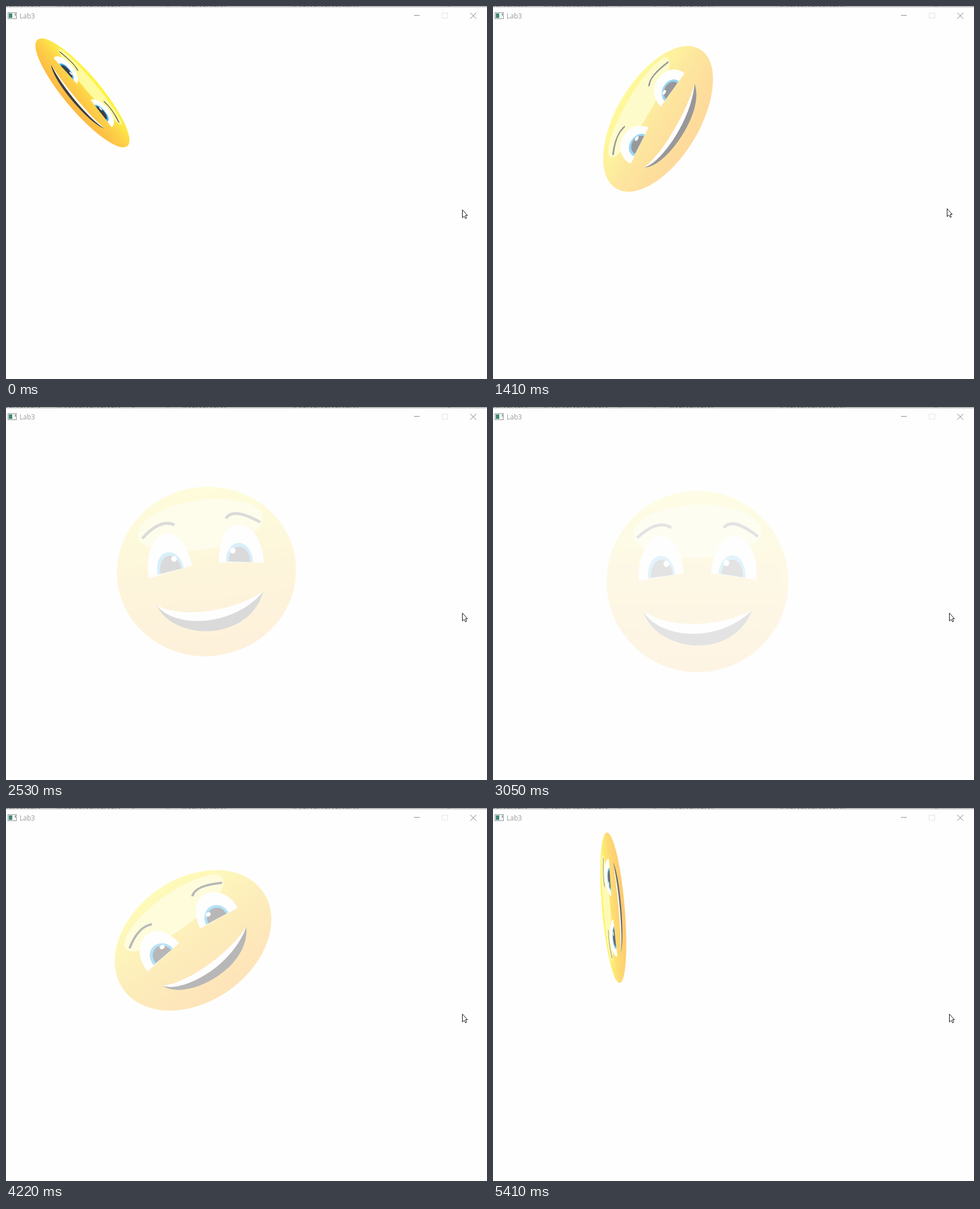
An HTML page that plays this animation: 850 px wide and 658 px high, repeating every 5510 ms.

```html
<!DOCTYPE html>
<html lang="en">
<head>
<meta charset="utf-8">
<title>Lab3</title>
<style>
html, body { margin: 0; width: 100%; height: 100%; overflow: hidden; background: #fefefe; }
svg { display: block; }
</style>
</head>
<body>
<svg width="850" height="658" viewBox="0 0 850 658">
  <defs>
    <linearGradient id="skin" x1="0" y1="0" x2="0" y2="1">
      <stop offset="0" stop-color="#fff640"/>
      <stop offset=".25" stop-color="#fde748"/>
      <stop offset=".5" stop-color="#fdd148"/>
      <stop offset=".75" stop-color="#fdc446"/>
      <stop offset="1" stop-color="#ffb843"/>
    </linearGradient>
  </defs>

  <!-- window frame -->
  <path d="M0 .5H850" stroke="#d8d8d8"/>
  <path d="M0 1.5H850" stroke="#969696"/>
  <path d="M0 .5H62M104 .5H205M323 .5H388M519 .5H622" stroke="#999" stroke-dasharray="3 3 5 2 2 4"/>
  <path d="M90 .5h8M223 .5h4M284 .5h4M312 .5h8M507 .5h6M780 .5h5" stroke="#b4b4b4"/>
  <rect x="3.5" y="11.5" width="15" height="11" fill="#f4f4f4" stroke="#8d979c"/>
  <rect x="5" y="13" width="6" height="8" fill="#3f8877"/>
  <path d="M16.5 13v4" stroke="#555"/>
  <text x="24" y="22" font-size="12" fill="#999" font-family="'Open Sans', 'Noto Sans', sans-serif">Lab3</text>
  <g fill="none">
    <path d="M721 16.5H731" stroke="#8a8a8a"/>
    <rect x="770.5" y="12.5" width="10" height="9" stroke="#e4e4e4"/>
    <path d="M820.5 12l10.5 10.5M831 12L820.5 22.5" stroke="#808080"/>
  </g>

  <g id="face">
    <circle r="1" fill="url(#skin)"/>
    <g transform="scale(.006305 .006693) rotate(7) translate(-354.5 -290.5)">
      <path fill="#fffa9f" d="M234 222C240 190 310 163 370 162C415 161 455 175 455 194C455 205 445 218 438 222C420 240 375 250 330 254C290 256 262 252 250 246C238 240 233 232 234 222Z"/>
      <g fill="#fff">
        <path d="M253 302C245 268 258 224 285 223C308 223 323 252 329 280Z"/>
        <path d="M376 274C376 240 388 208 411 208C437 208 455 240 456 275Z"/>
        <path d="M266 349C300 372 395 366 455 326C415 400 290 390 266 349Z"/>
      </g>
      <g fill="#3cb2ec">
        <path d="M268 296C264 275 272 256 288 256C303 256 312 272 314 284Z"/>
        <path d="M389 273C389 255 399 240 411 240C426 240 436 256 437 274Z"/>
      </g>
      <g fill="#3e3e42">
        <path d="M273 294.500C270 278 277 263 289 262C300 262 308 274 310 285Z"/>
        <path d="M394 273C394 258 401 247 412 247C424 247 432 260 432 274Z"/>
        <path d="M266 349C292 412 428 418 455 326C395 395 290 387 266 349Z"/>
      </g>
      <g fill="#fff"><circle cx="297" cy="268" r="5"/><circle cx="401" cy="254" r="5"/></g>
      <g fill="none" stroke="#3e3e42" stroke-width="5">
        <path d="M241 232C262 208 282 200 298 208"/>
        <path d="M389 197C398 183 418 186 450 204"/>
      </g>
    </g>
  </g>

  <path id="cursor" d="M.5 .5V14.500L3.700 11.600L6 16L8 15L6 10.500H9.500Z" fill="#fff" stroke="#111"/>
</svg>
<script>
const LOOP = 5510, LAST = 5410, TURN = 3055;
const face = document.getElementById('face');
const cursor = document.getElementById('cursor');

// tilt in degrees, centre x, centre y
const track = [
  [0, 361.4, 308], [7.1, 354.5, 290.5], [34.7, 330.5, 233.5],
  [59, 291.5, 199], [92.4, 218, 177.5], [130.3, 135, 153.2]
];

// Uniform speed that slows to rest at the turning point
function tilt(t) {
  const d = Math.abs(TURN - t), ease = 960, speed = 0.0506;
  return d < ease ? speed * d * d / (2 * ease) : speed * (d - ease / 2);
}

function slope(i, k) {
  const a = track[Math.max(i - 1, 0)], b = track[Math.min(i + 1, track.length - 1)];
  return (b[k] - a[k]) / (b[0] - a[0]);
}

// Cubic Hermite curve along the track
function along(q, k) {
  let i = 0;
  while (i < track.length - 2 && q > track[i + 1][0]) i++;
  const p = track[i], n = track[i + 1], h = n[0] - p[0];
  const u = (q - p[0]) / h, v = 1 - u;
  return v * v * (1 + 2 * u) * p[k] + u * u * (3 - 2 * u) * n[k]
    + h * u * v * (v * slope(i, k) - u * slope(i + 1, k));
}

function glide(t, start, end) {
  const u = Math.min(1, Math.max(0, (t - start) / (end - start)));
  return u * u * (3 - 2 * u);
}

function draw(now) {
  const t = Math.min(now % LOOP, LAST);
  const q = tilt(t);
  const rx = 160.6 - 0.289 * q;
  const ry = 160 - 1.475 * q;
  face.setAttribute('transform',
    `translate(${along(q, 1)} ${along(q, 2)}) rotate(${-q}) scale(${rx} ${ry})`);
  face.setAttribute('opacity', Math.min(1, 0.135 + 0.0066 * q));

  const out = glide(t, 150, 350), back = glide(t, 1900, 2100);
  const x = Math.round(806 - 4 * out + 4 * back);
  const y = Math.round(359 - 2 * out + 6 * back);
  cursor.setAttribute('transform', `translate(${x} ${y})`);
  requestAnimationFrame(() => draw(performance.now() - begin));
}

const begin = performance.now();
draw(0);
</script>
</body>
</html>
```
